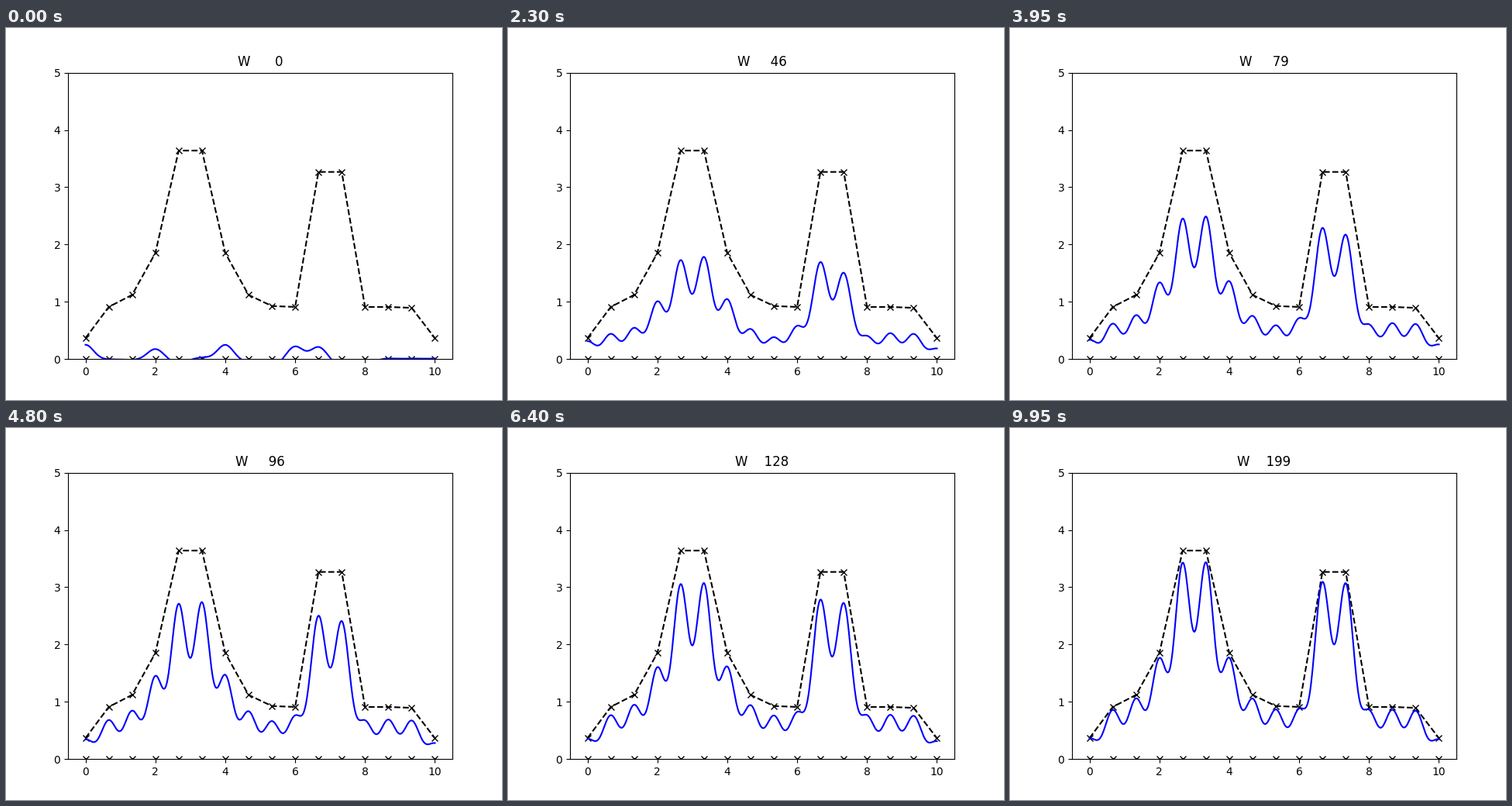
Write a matplotlib script that moves like this. It is 640 by 480 pixels and loops after 10000 ms.

```python
import numpy as np
import matplotlib.pyplot as plt
from matplotlib.animation import FuncAnimation

FRAMES = 200
INTERVAL = 50
UNITS = 16
RATE = 0.0139
SHARPNESS = 10

centers = np.linspace(0, 10, UNITS)


def basis(x):
    """Gaussian bumps around every center, one row per x."""
    return np.exp(-SHARPNESS * (x[:, None] - centers) ** 2)


def goal(x):
    """Floor that dips at both ends, a peak at 3 and a block at 7."""
    edge = np.minimum(x, 10 - x)
    floor = 0.91 - 0.545 * np.exp(-8 * edge ** 2)
    peak = 4.22 * np.clip(1 - abs(x - 3) / 3, 0, None) ** 3.7
    block = 2.357 * (abs(x - 7) < 0.5)
    return floor + peak + block


def first_guess():
    """Slowing ripple that is flat over the last few centers."""
    k = np.arange(UNITS)
    ripple = 0.2 * np.cos(2 * np.pi * k * (0.36 - 0.005 * k))
    ripple += 0.05 + 0.07 * np.sin(np.pi * k / 2)
    return np.where(k < 13, ripple, 0.01)


def train(targets):
    """Weights before each gradient descent step."""
    phi = basis(centers)
    weights = np.linalg.solve(phi, first_guess())
    history = []
    for _ in range(FRAMES):
        history.append(weights)
        weights = weights + RATE * phi.T @ (targets - phi @ weights)
    return history


targets = goal(centers)
history = train(targets)
xs = np.linspace(0, 10, 501)
bumps = basis(xs)

fig, ax = plt.subplots(figsize=(6.4, 4.8), dpi=100)
ax.plot(centers, targets, "kx--")
ax.plot(centers, np.zeros(UNITS), "kx")
curve, = ax.plot(xs, bumps @ history[0], "b")
ax.set_ylim(0, 5)
title = ax.set_title("")


def update(step):
    curve.set_ydata(bumps @ history[step])
    title.set_text(f"W {step:6d}")
    return curve, title


anim = FuncAnimation(fig, update, frames=FRAMES, interval=INTERVAL,
                     init_func=lambda: update(0), repeat=True, repeat_delay=0)
plt.show()
```
